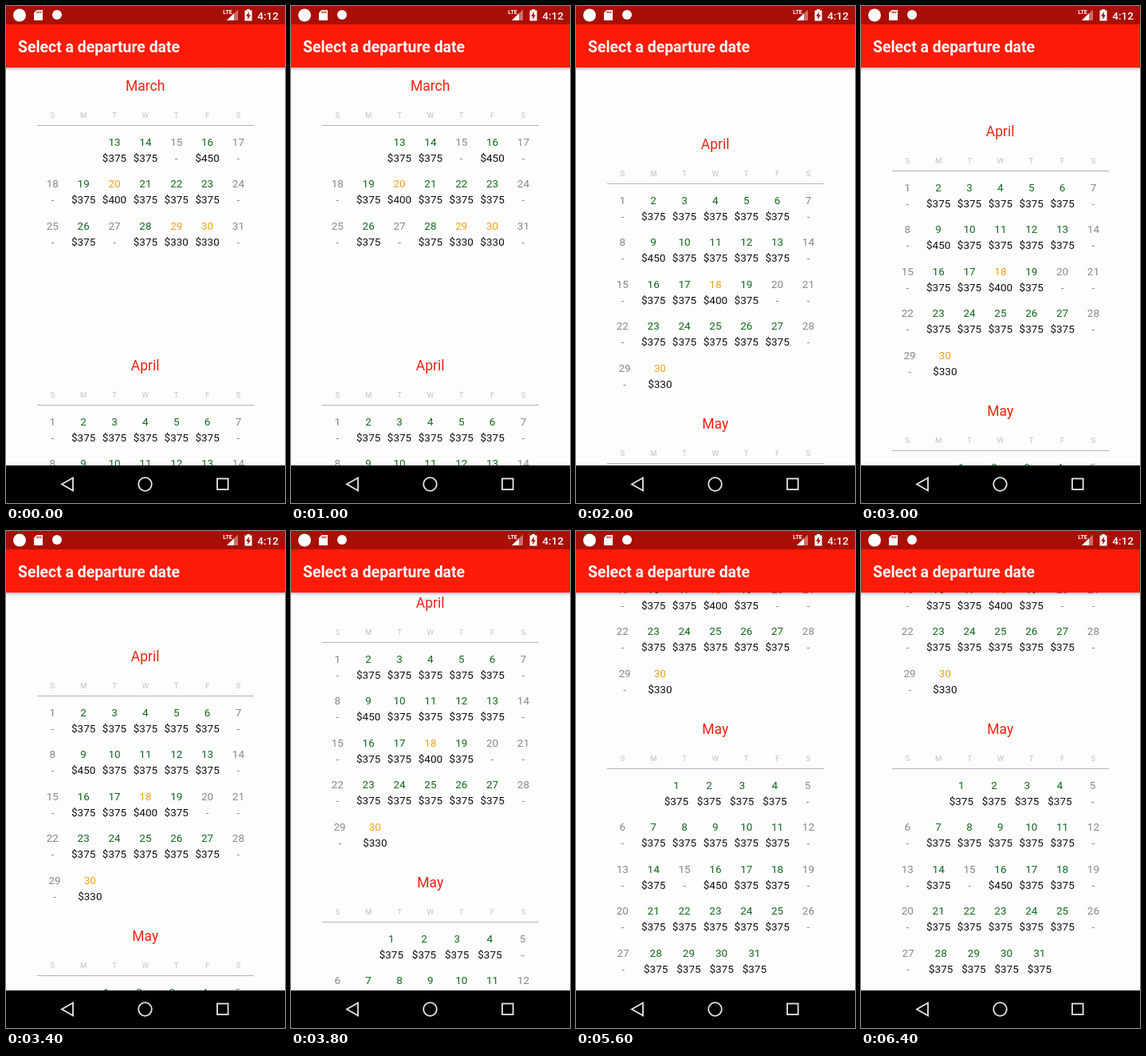
Animation, 350 px wide and 622 px high, one loop 7 s. Source, as an HTML page with a canvas:

```html
<!DOCTYPE html>
<html lang="en">
<head>
<meta charset="utf-8">
<title>Select a departure date</title>
<style>
html, body { margin: 0; width: 100%; height: 100%; overflow: hidden; background: #fdfdfd; }
canvas { display: block; width: 350px; height: 622px; }
</style>
</head>
<body>
<canvas id="stage"></canvas>
<script>
const W = 350, H = 622, LOOP = 7000, STEP = 200;
const canvas = document.getElementById('stage');
const ratio = window.devicePixelRatio || 1;
canvas.width = W * ratio;
canvas.height = H * ratio;
const ctx = canvas.getContext('2d');
ctx.scale(ratio, ratio);

const GREEN = '#14691f', ORANGE = '#f3a01c', GREY = '#888', RED = '#f0220f';
const COL = 38.86, LEFT = 58.3;

// Day codes: price and colour of the day number
const fares = {
  '-': ['-', GREY],
  g: ['$375', GREEN],
  h: ['$450', GREEN],
  o: ['$400', ORANGE],
  l: ['$330', ORANGE]
};

// Each week: first day, codes, x of first cell, cell spacing
const months = [
  ['March', [[13, 'gg-h-', LEFT + 2 * COL], [18, '-goggg-'], [25, '-g-gll-']]],
  ['April', [[1, '-ggggg-'], [8, '-hgggg-'], [15, '-ggog--'], [22, '-ggggg-'],
             [29, '-l', 61, 44.3]]],
  ['May', [[1, 'gggg-', 125.8, 41.2], [6, '-ggggg-'], [13, '-g-hgg-'], [20, '-ggggg-'],
           [27, '-gggg', 59, 41.2]]]
];

// Scroll offset over time: two flings with a pause between
const scrollKeys = [
  [0, 0], [1000, 0], [1200, 42], [1400, 114], [1600, 190], [1800, 246], [2000, 277],
  [2200, 289], [2400, 293], [3400, 293], [3600, 314], [3800, 360], [4000, 480],
  [4200, 551], [5400, 551], [5600, 552], [LOOP, 552]
];

function scrollAt(t) {
  const i = scrollKeys.findIndex(k => k[0] > t);
  const [t0, s0] = scrollKeys[i - 1], [t1, s1] = scrollKeys[i];
  return Math.round(s0 + (s1 - s0) * (t - t0) / (t1 - t0));
}

function text(str, x, y, size, color, align = 'center', weight = 400) {
  ctx.font = `${weight} ${size}px Roboto, sans-serif`;
  ctx.textAlign = align;
  ctx.fillStyle = color;
  ctx.fillText(str, x, y);
}

function rect(x, y, w, h, color) {
  ctx.fillStyle = color;
  ctx.fillRect(x, y, w, h);
}

function shape(points, color) {
  ctx.beginPath();
  points.forEach(([x, y]) => ctx.lineTo(x, y));
  ctx.closePath();
  ctx.fillStyle = color;
  ctx.fill();
}

function disc(x, y, r) {
  ctx.beginPath();
  ctx.arc(x, y, r, 0, 7);
  ctx.fillStyle = '#fff';
  ctx.fill();
}

function drawMonth([name, weeks], y) {
  text(name, 174.7, y + 6, 17.5, RED);
  [...'SMTWTFS'].forEach((d, i) => text(d, LEFT + i * COL, y + 39.5, 9.7, '#c2c2c2'));
  rect(39, y + 49, 272, 1, '#b4b4b4');
  weeks.forEach(([first, codes, x0 = LEFT, step = COL], row) => {
    const base = y + 74.8 + row * 52.5;
    [...codes].forEach((code, i) => {
      const [price, color] = fares[code];
      const x = x0 + i * step;
      text(first + i, x, base, 13.5, color);
      text(price, x, base + 20, 13.5, code === '-' ? GREY : '#111');
    });
  });
}

function drawStatus() {
  rect(0, 0, W, 23, '#a90f06');
  disc(17, 11.5, 8);
  disc(64, 11, 6);
  shape([[38.5, 5], [46, 5], [46, 18], [35, 18], [35, 8.5]], '#fff');
  for (let i = 0; i < 3; i++) rect(38.5 + i * 2.3, 6.5, 1.2, 2.6, '#a90f06');
  shape([[291, 4.5], [291, 18], [277, 18]], 'rgba(255,255,255,.4)');
  shape([[286, 9.3], [286, 18], [277, 18]], '#fff');
  text('LTE', 278, 10, 7, '#fff', 'center', 700);
  rect(302, 4, 4, 2, '#fff');
  rect(299.5, 5.5, 9, 13, '#fff');
  shape([[305, 7], [301, 12.8], [303.4, 12.8], [303, 17], [307, 11.2], [304.6, 11.2]], '#a90f06');
  text('4:12', 342, 16.8, 13.6, '#fff', 'right', 500);
}

function drawHeader() {
  const shade = ctx.createLinearGradient(0, 77, 0, 81);
  shade.addColorStop(0, 'rgba(0,0,0,.25)');
  shade.addColorStop(1, 'rgba(0,0,0,0)');
  rect(0, 77, W, 4, shade);
  rect(0, 23, W, 54, '#ff1b07');
  text('Select a departure date', 15, 58, 19.4, '#fff', 'left', 700);
}

function drawNav() {
  rect(0, 575, W, 47, '#000');
  ctx.strokeStyle = '#e6e6e6';
  ctx.lineWidth = 1.8;
  ctx.beginPath();
  ctx.moveTo(70, 598.5);
  ctx.lineTo(84, 590.5);
  ctx.lineTo(84, 606.5);
  ctx.closePath();
  ctx.stroke();
  ctx.beginPath();
  ctx.arc(174.5, 598.5, 8.3, 0, 7);
  ctx.stroke();
  ctx.strokeRect(265, 591.5, 13.6, 13.6);
}

function draw(t) {
  rect(0, 0, W, H, '#fdfdfd');
  const offset = scrollAt(Math.floor(t / STEP) * STEP);
  months.forEach((m, i) => drawMonth(m, 100 + i * 350 - offset));
  drawHeader();
  drawStatus();
  drawNav();
}

const start = performance.now();
function tick() {
  draw((performance.now() - start) % LOOP);
  requestAnimationFrame(tick);
}
tick();
</script>
</body>
</html>
```
